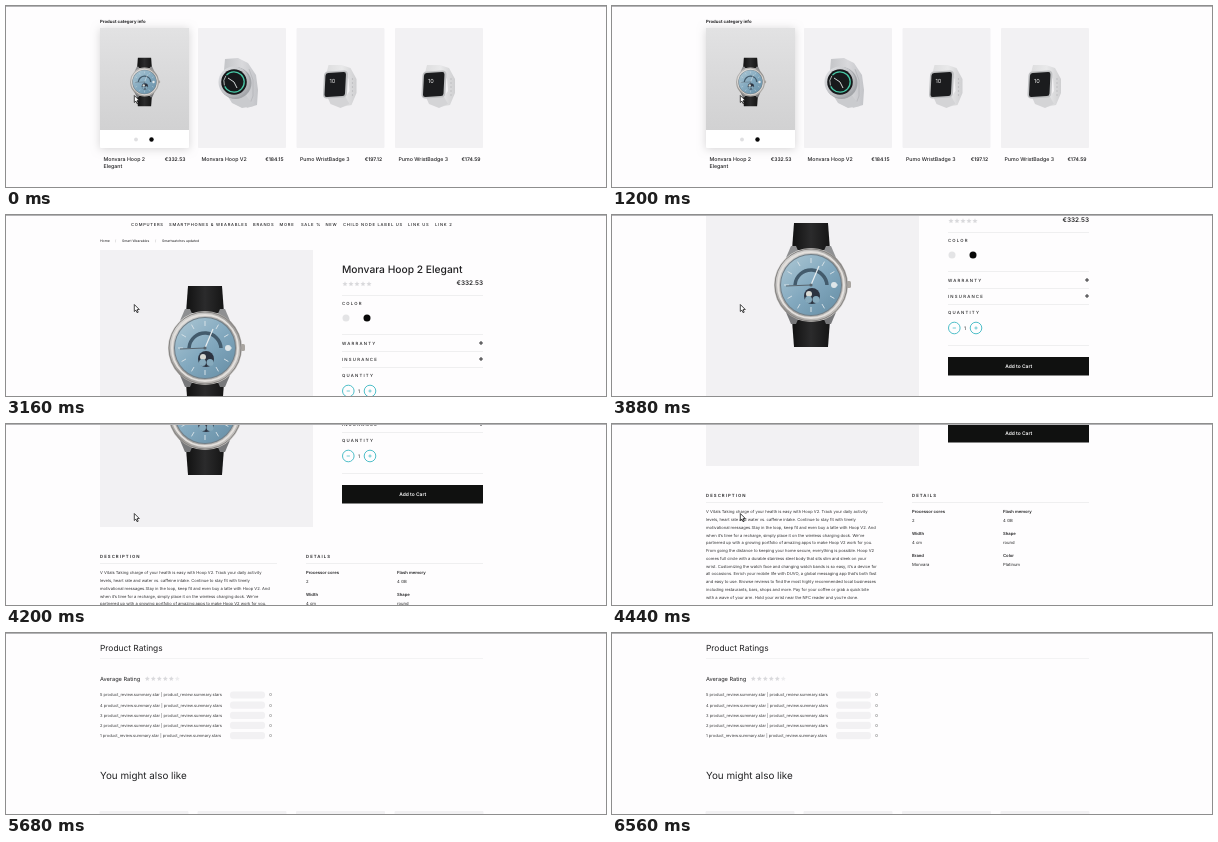
Recreate the animation shown at these times as an HTML page with a canvas. Size 600 by 181 pixels, loop 6.6 s.

```html
<!DOCTYPE html>
<html lang="en">
<head>
<meta charset="utf-8">
<title>Shop walkthrough</title>
<style>
  html, body { margin: 0; width: 100%; height: 100%; overflow: hidden; background: #fefdfe; }
  canvas { display: block; width: 600px; height: 181px; }
</style>
</head>
<body>
<canvas id="stage" width="600" height="181"></canvas>
<script>
const ctx = document.getElementById('stage').getContext('2d');
const LOOP = 6600, STEP = 40, PAGE_OPENS = 2760;
const INK = '#202022', PANEL = '#f2f1f3', PAPER = '#fefdfe', TEAL = '#4fbfc9';
const CARD_X = [94, 192, 290.5, 389];
const SCROLL = [[3760, 0], [3880, 63], [4440, 205], [4920, 378], [5120, 448]];
const POINTER_X = [[5040, 128.3], [5080, 92], [5120, 49], [5160, 14], [5200, -20]];
const POINTER_Y = [[5040, 89.5], [5200, 112]];

const PRODUCTS = [
  ['Monvara Hoop 2', '€332.53'],
  ['Monvara Hoop V2', '€184.15'],
  ['Pumo WristBadge 3', '€197.12'],
  ['Pumo WristBadge 3', '€174.59']
];
const NAV = [
  ['COMPUTERS', 125], ['SMARTPHONES & WEARABLES', 163], ['BRANDS', 247],
  ['MORE', 273.5], ['SALE %', 295], ['NEW', 319.5],
  ['CHILD NODE LABEL US', 337], ['LINK US', 402], ['LINK 2', 429]
];
const DESCRIPTION = [
  'V Vitals Taking charge of your health is easy with Hoop V2. Track your daily activity',
  'levels, heart rate and water vs. caffeine intake. Continue to stay fit with timely',
  'motivational messages.Stay in the loop, keep fit and even buy a latte with Hoop V2. And',
  'when it’s time for a recharge, simply place it on the wireless charging dock. We’ve',
  'partnered up with a growing portfolio of amazing apps to make Hoop V2 work for you.',
  'From going the distance to keeping your home secure, everything is possible. Hoop V2',
  'comes full circle with a durable stainless steel body that sits slim and sleek on your',
  'wrist. Customizing the watch face and changing watch bands is so easy, it’s a device for',
  'all occasions. Enrich your mobile life with DUVO, a global messaging app that’s both fast',
  'and easy to use. Browse reviews to find the most highly recommended local businesses',
  'including restaurants, bars, shops and more. Pay for your coffee or grab a quick bite',
  'with a wave of your arm. Hold your wrist near the NFC reader and you’re done.'
];
const DETAILS = [
  ['Processor cores', '2', 'Flash memory', '4 GB'],
  ['Width', '4 cm', 'Shape', 'round'],
  ['Brand', 'Monvara', 'Color', 'Platinum']
];

function track(keys, t) {
  if (t <= keys[0][0]) return keys[0][1];
  for (let i = 1; i < keys.length; i++) {
    const [t0, a] = keys[i - 1], [t1, b] = keys[i];
    if (t <= t1) return a + (b - a) * (t - t0) / (t1 - t0);
  }
  return keys[keys.length - 1][1];
}

// y is the middle of the capitals
function text(str, x, y, size, { weight = 400, color = INK, align = 'left', spacing = 0 } = {}) {
  ctx.font = `${weight} ${size}px Inter, sans-serif`;
  ctx.letterSpacing = spacing + 'px';
  ctx.textAlign = align;
  ctx.fillStyle = color;
  ctx.fillText(str, x, y + size * 0.36);
}

function rect(x, y, w, h, color, radius = 0) {
  ctx.fillStyle = color;
  ctx.beginPath();
  ctx.roundRect(x, y, w, h, radius);
  ctx.fill();
}

function disc(x, y, r, color) {
  ctx.fillStyle = color;
  ctx.beginPath();
  ctx.arc(x, y, r, 0, Math.PI * 2);
  ctx.fill();
}

function arc(x, y, r, color, width, from = 0, to = Math.PI * 2) {
  ctx.strokeStyle = color;
  ctx.lineWidth = width;
  ctx.beginPath();
  ctx.arc(x, y, r, from, to);
  ctx.stroke();
}

function path(points, fill, stroke, width = 1) {
  ctx.beginPath();
  points.forEach(([x, y], i) => i ? ctx.lineTo(x, y) : ctx.moveTo(x, y));
  if (fill) { ctx.closePath(); ctx.fillStyle = fill; ctx.fill(); }
  if (stroke) { ctx.strokeStyle = stroke; ctx.lineWidth = width; ctx.stroke(); }
}

const rule = (x0, x1, y, color = '#efeff0') => rect(x0, Math.floor(y), x1 - x0, 1, color);

function at(x, y, scale, draw) {
  ctx.save();
  ctx.translate(x, y);
  ctx.scale(scale, scale);
  draw();
  ctx.restore();
}

function blend(x0, y0, x1, y1, ...colors) {
  const g = ctx.createLinearGradient(x0, y0, x1, y1);
  colors.forEach((c, i) => g.addColorStop(i / (colors.length - 1), c));
  return g;
}

function stars(x, y, count, r) {
  for (let i = 0; i < count; i++) {
    const points = Array.from({ length: 10 }, (_, k) => {
      const a = k * Math.PI / 5 - Math.PI / 2, d = k % 2 ? r * 0.45 : r;
      return [x + i * 6 + Math.cos(a) * d, y + Math.sin(a) * d];
    });
    path(points, i === 5 ? '#ececee' : '#d9d9dc');
  }
}

function leatherWatch() {
  const leather = blend(-19, 0, 19, 0, '#111', '#2b2b2c', '#151515');
  for (const sy of [-1, 1]) {
    path([[-17, 62 * sy], [17, 62 * sy], [19, 35 * sy], [-19, 35 * sy]], leather);
    for (const sx of [-1, 1]) {
      path([[20 * sx, 39 * sy], [15 * sx, 39 * sy], [11 * sx, 30 * sy], [26 * sx, 25 * sy]],
        sy < 0 ? '#8f9092' : '#77787a');
    }
  }
  rect(35, -4, 5, 7, '#a9a5a0', 1.5);
  disc(0, 0, 37, blend(-30, -30, 30, 30, '#dedddc', '#9c9996', '#c9c6c3'));
  arc(0, 0, 36, '#858381', 1);
  arc(0, 0, 33, '#e3e0dd', 2);
  disc(0, 0, 31, '#6f7e88');
  disc(0, 0, 30, blend(-22, -22, 20, 24, '#a3c0cf', '#83a9bf', '#6d94ab'));
  for (let i = 0; i < 12; i++) {
    const c = Math.cos(i * Math.PI / 6), s = Math.sin(i * Math.PI / 6);
    path([[c * 22, s * 22], [c * 27, s * 27]], null, '#d5e0e6', 1);
  }
  arc(0, 1, 16, '#435b6c', 3.5, Math.PI * 1.02, Math.PI * 1.98);
  disc(23, 0, 3, '#dfe6e9');
  disc(1, 11, 8, '#2c3340');
  disc(-2, 9, 3, '#d8d9d3');
  disc(-2.5, 14.5, 3.5, '#86aabd');
  disc(5, 14.5, 3.5, '#86aabd');
  path([[-25, 1], [0, 0]], null, '#58646d', 1);
  path([[0, 0], [8, -19]], null, '#e9eef0', 1.2);
  disc(0, 0, 1.6, '#58646d');
}

function roundWatch() {
  path([[-9, -23], [4, -24], [14, -19], [22, -7], [24, 8], [23, 23], [13, 26], [8, 18],
    [13, 8], [12, -7], [5, -13], [-10, -12]], blend(-8, 0, 24, 0, '#c6c7ca', '#d9d9dc', '#c3c4c8'));
  path([[15, -13], [19, -2], [19, 14], [15, 24]], null, '#b4b5b9', 0.8);
  path([[-7, 13], [11, 12], [20, 24], [8, 26], [-2, 21]], '#cacbce');
  disc(1.5, 1, 16, '#a4a6aa');
  disc(0, 0, 15.5, blend(-12, -12, 12, 12, '#dcdde0', '#a8aaae'));
  disc(0, 0, 12.8, '#17191b');
  arc(0, 0, 10.2, '#48c9a7', 1.3, -2.4, 2.7);
  arc(0, 0, 10.2, '#d8e0de', 0.8, 2.8, 3.8);
  path([[-6, -4], [0, 0], [3, 6]], null, '#e8eceb', 0.9);
}

function squareWatch() {
  path([[-7, -19], [6, -19], [15, -16], [21, -5], [21, 9], [16, 21], [6, 23], [9, 14],
    [14, 7], [13, -5], [8, -11], [-9, -11]], blend(-8, 0, 21, 0, '#dededf', '#e9e9ea', '#cfcfd1'));
  path([[-9, 11], [9, 11], [14, 20], [5, 24], [-5, 20]], '#d4d4d6');
  for (let i = 0; i < 5; i++) disc(17, -5 + i * 4, 0.7, '#b6b6b9');
  ctx.save();
  ctx.transform(1, -0.06, -0.05, 1, 0, 0);
  rect(-12, -13, 24, 27, '#bfc0c2', 4);
  rect(-10.5, -11.5, 20.5, 24, '#1b1c1e', 2.5);
  ctx.restore();
  text('10', -3, -3.5, 5.6, { color: '#eee', align: 'center' });
}

function categoryPage() {
  text('Product category info', 94, 15.3, 4.3, { weight: 700 });
  CARD_X.forEach((x, i) => {
    if (i) return rect(x, 22, 88, 120, PANEL, 1);
    ctx.save();
    ctx.shadowColor = 'rgba(0,0,0,.16)';
    ctx.shadowBlur = 9;
    ctx.shadowOffsetY = 1;
    rect(x, 22, 89, 120, '#fff', 1);
    ctx.restore();
    rect(x, 22, 89, 102, blend(0, 22, 0, 124, '#e2e2e3', '#d9d9da', '#d1d1d2'));
  });
  at(138.5, 76, 0.39, leatherWatch);
  at(228, 76, 1, roundWatch);
  at(329.5, 78, 1, squareWatch);
  at(428, 78, 1, squareWatch);
  disc(130, 133.5, 1.9, '#dfdfe1');
  disc(145.5, 133.5, 2.2, '#080808');
  PRODUCTS.forEach(([name, price], i) => {
    const x = CARD_X[i] + 3.5;
    text(name, x, 153.3, 5.25, { weight: 500 });
    text(price, x + 82, 153.3, 5, { weight: 600, align: 'right' });
  });
  text('Elegant', 97.5, 160, 5.25, { weight: 500 });
}

function buyColumn() {
  const label = { weight: 500, spacing: 1.2 };
  text('Monvara Hoop 2 Elegant', 336, 54.5, 10.25, { weight: 500 });
  stars(339, 69, 5, 2.7);
  text('€332.53', 477, 67.7, 6.4, { weight: 600, align: 'right' });
  [80, 119, 136, 152, 193].forEach(y => rule(336, 477, y));
  text('COLOR', 336, 88.5, 4.3, label);
  disc(340, 103, 3.5, '#e4e4e6');
  disc(361, 103, 3.5, '#080808');
  text('WARRANTY', 336, 128, 4.3, label);
  text('INSURANCE', 336, 144, 4.3, label);
  text('QUANTITY', 336, 160, 4.3, label);
  [128, 144].forEach(y => {
    path([[473, y], [477, y]], null, INK, 0.9);
    path([[475, y - 2], [475, y + 2]], null, INK, 0.9);
  });
  [342.3, 364].forEach(x => {
    arc(x, 176, 5.8, TEAL, 1);
    path([[x - 1.6, 176], [x + 1.6, 176]], null, TEAL, 0.8);
  });
  path([[364, 174.4], [364, 177.6]], null, TEAL, 0.8);
  text('1', 353, 176, 4.8, { align: 'center' });
  rect(336, 205, 141, 18.5, '#101110');
  text('Add to Cart', 406.7, 214.3, 4.9, { weight: 600, color: '#fff', align: 'center' });
}

function infoSection() {
  const heading = { weight: 600, spacing: 1.05 };
  text('DESCRIPTION', 94, 276, 4.3, heading);
  text('DETAILS', 300, 276, 4.3, heading);
  rule(94, 271, 283);
  rule(300, 477, 283);
  DESCRIPTION.forEach((str, i) => text(str, 94, 293 + i * 7.75, 4.1, { color: '#333335' }));
  DETAILS.forEach((row, i) => row.forEach((cell, k) => {
    const isName = k % 2 === 0;
    text(cell, k < 2 ? 300 : 391, 292.3 + i * 22.1 + (isName ? 0 : 9.2), 4.2,
      { weight: isName ? 600 : 400 });
  }));
  text('SKU: 063_20964015', 94, 393.5, 4.1);
}

function reviewSection() {
  text('Ratings & Reviews', 94, 428, 10);
  rule(195, 419, 427, '#e4e4e6');
  text('WRITE A REVIEW', 435, 428, 3.4, { weight: 700, spacing: 1 });
  text('Product Ratings', 94, 463.3, 8.4);
  rule(94, 477, 473, '#f3f3f4');
  text('Average Rating', 94, 494, 5.65);
  stars(141.3, 493.8, 6, 2.6);
  for (let i = 0; i < 5; i++) {
    const y = 510 + i * 10.15;
    text(`${5 - i} product_review.summary.star | product_review.summary.stars`, 94, y, 4.05,
      { color: '#3a3a3c' });
    rect(224, y - 3.6, 35, 7.2, PANEL, 3);
    text('0', 263.3, y, 4.1, { color: '#555' });
  }
  text('You might also like', 94, 590.5, 9.85);
  CARD_X.forEach(x => rect(x - 0.5, 626, 89, 120, PANEL, 1));
}

function productPage(scroll) {
  ctx.save();
  ctx.translate(0, -scroll);
  NAV.forEach(([label, x]) => text(label, x, 9.5, 4.1, { weight: 500, spacing: 0.75 }));
  text('Home', 94, 26, 3.5);
  text('Smart Wearables', 116, 26, 3.4);
  text('Smartwatches updated', 156, 26, 3.4);
  [109, 149].forEach(x => text('/', x, 26, 3.4, { color: '#999' }));
  rect(94, 35, 213, 212, PANEL);
  at(199, 133, 1, leatherWatch);
  buyColumn();
  infoSection();
  reviewSection();
  ctx.restore();
}

function pointer(x, y) {
  at(x, y, 1, () => path([[0, 0], [0, 7], [1.6, 5.6], [2.8, 8.2], [3.9, 7.7], [2.8, 5.1], [5, 5], [0, 0]],
    '#fff', '#1a1a1a', 0.8));
}

function draw(now) {
  const t = Math.floor((now % LOOP) / STEP) * STEP;
  rect(0, 0, 600, 181, PAPER);
  if (t < PAGE_OPENS) categoryPage();
  else productPage(Math.round(track(SCROLL, t)));
  rect(0, 0, 600, 1, '#b4b4b6');
  pointer(track(POINTER_X, t), track(POINTER_Y, t));
}

ctx.textRendering = 'geometricPrecision';
function loop() {
  draw(performance.now());
  requestAnimationFrame(loop);
}
loop();
</script>
</body>
</html>
```
